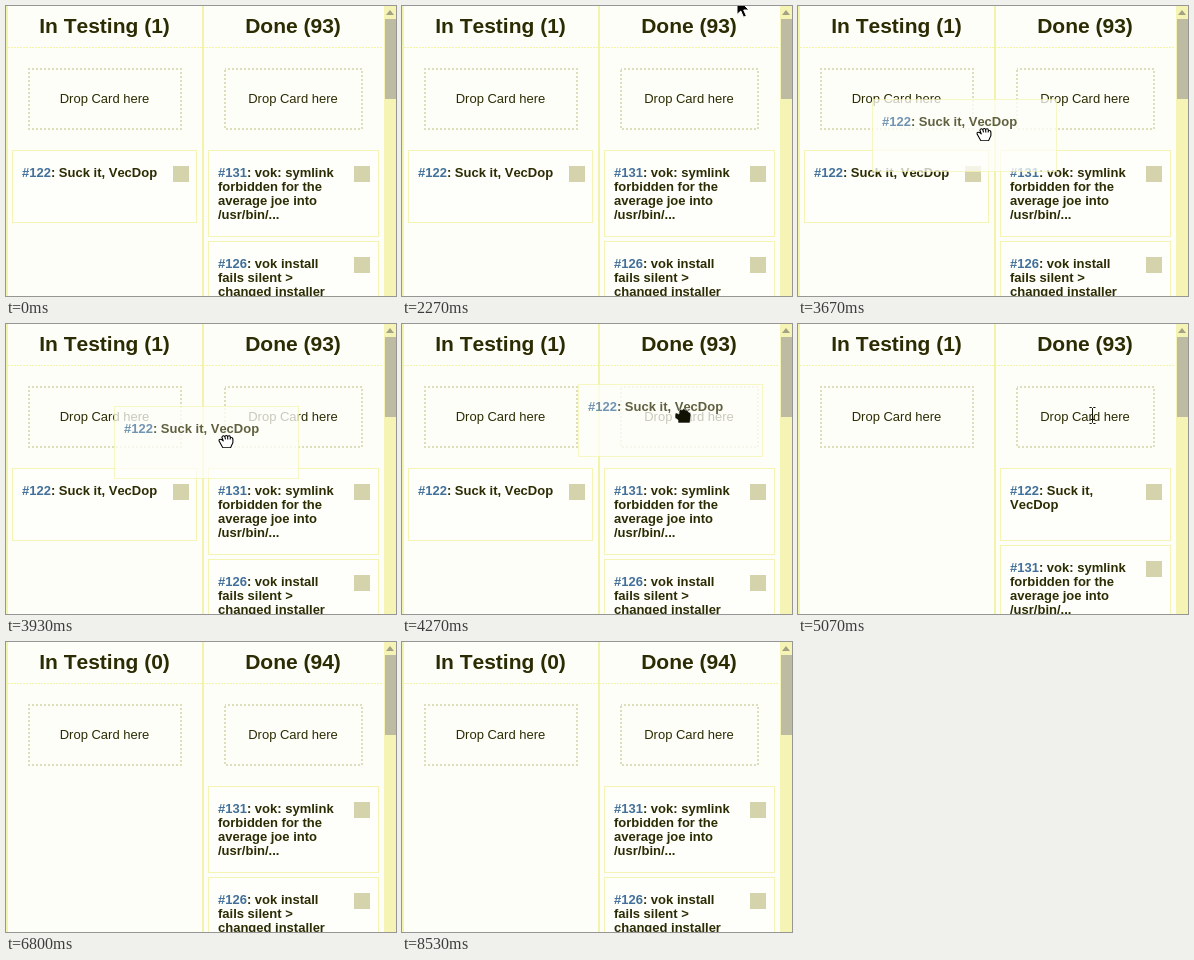
An HTML page for the animation above (9330 ms loop, 390 by 290 pixels).

```html
<!DOCTYPE html>
<html lang="en">
<head>
<meta charset="utf-8">
<title>Card board</title>
<style>
  html, body { margin: 0; width: 100%; height: 100%; overflow: hidden; background: #fefef8; }
  svg { display: block; width: 390px; height: 290px; }
  text { font: 13px "Liberation Sans", Arial, sans-serif; font-kerning: none; fill: #2c2c04; white-space: pre; }
  .title { font-size: 21px; font-weight: bold; text-anchor: middle; }
  .drop text { text-anchor: middle; }
  .drop rect { fill: none; stroke: #dedebc; stroke-width: 2; stroke-dasharray: 2 2; stroke-dashoffset: 1; }
  .card text { font-weight: bold; }
  .card .id { fill: #42709a; }
  .card .box { fill: #fefefa; stroke: #f5f4b4; }
  .line { stroke: #f4f3ac; fill: none; }

  /* One loop is 140 ticks; percentages are tick / 140. */
  .anim { animation: 9330ms step-end infinite; }
  #pointer { animation-name: travel; }
  #arrow { animation-name: arrow; }
  #hand { animation-name: hand; }
  #fist { animation-name: fist; }
  #beam { animation-name: beam; }
  #ghost { animation-name: ghost; }
  #waiting { animation-name: waiting; }
  #moved { animation-name: moved; }
  #list { animation-name: push; }
  .before { animation-name: before; }
  .after { animation-name: after; }

  @keyframes travel {
    0% { transform: translate(335px, -8px); }
    24.286% { transform: translate(335px, -8px); animation-timing-function: steps(11); }
    32.143% { transform: translate(112px, 174px); }
    34.286% { transform: translate(112px, 174px); animation-timing-function: steps(7); }
    39.286% { transform: translate(180px, 124px); animation-timing-function: steps(9); }
    45.714% { transform: translate(282px, 91px); animation-timing-function: steps(5); }
    49.286% { transform: translate(295px, 91px); }
    65.714% { transform: translate(295px, 91px); animation-timing-function: steps(5); }
    69.286% { transform: translate(340px, 104px); }
    70.714% { transform: translate(340px, 104px); animation-timing-function: steps(3); }
    72.857%, 100% { transform: translate(394px, 130px); }
  }
  @keyframes arrow {
    0%, 35%, 72.857%, 100% { visibility: hidden; }
    24.286%, 66.429% { visibility: visible; }
  }
  @keyframes hand {
    0%, 42.857%, 100% { visibility: hidden; }
    35% { visibility: visible; }
  }
  @keyframes fist {
    0%, 51.429%, 100% { visibility: hidden; }
    42.857% { visibility: visible; }
  }
  @keyframes beam {
    0%, 66.429%, 100% { visibility: hidden; }
    51.429% { visibility: visible; }
  }
  @keyframes ghost {
    0%, 51.429%, 100% { visibility: hidden; }
    35% { visibility: visible; }
  }
  @keyframes waiting {
    0% { visibility: visible; }
    52.143%, 100% { visibility: hidden; }
  }
  @keyframes moved {
    0%, 59.286%, 100% { visibility: hidden; }
    52.143% { visibility: visible; }
  }
  @keyframes push {
    0%, 59.286%, 100% { transform: none; }
    52.143% { transform: translateY(77px); }
  }
  @keyframes before {
    0% { visibility: visible; }
    59.286%, 100% { visibility: hidden; }
  }
  @keyframes after {
    0% { visibility: hidden; }
    59.286%, 100% { visibility: visible; }
  }
</style>
</head>
<body>
<svg viewBox="0 0 390 290">
  <defs>
    <rect id="badge" width="16" height="16" fill="#d5d3ab"/>
    <g id="task" class="card">
      <rect class="box" x=".5" y=".5" width="184" height="72"/>
      <text x="10" y="27"><tspan class="id">#122</tspan>: Suck it, VecDop</text>
    </g>
  </defs>

  <g class="line">
    <path d="M1 0V290M197 0V290" stroke-width="2"/>
    <path d="M2 41.5H377" stroke-dasharray="2 1"/>
  </g>

  <g>
    <text class="title anim before" x="98.5" y="27">In Testing (1)</text>
    <text class="title anim after" x="98.5" y="27">In Testing (0)</text>
    <text class="title anim before" x="287" y="27">Done (93)</text>
    <text class="title anim after" x="287" y="27">Done (94)</text>
  </g>

  <g class="drop">
    <rect x="23" y="63" width="152" height="60"/>
    <text x="98.5" y="97">Drop Card here</text>
    <rect x="219" y="63" width="137" height="60"/>
    <text x="287" y="97">Drop Card here</text>
  </g>

  <g id="waiting" class="anim">
    <use href="#task" x="6" y="144"/>
    <use href="#badge" x="167" y="160"/>
  </g>

  <g id="moved" class="anim card">
    <rect class="box" x="202.5" y="144.5" width="170" height="72"/>
    <text x="212" y="171"><tspan class="id">#122</tspan>: Suck it,<tspan x="212" dy="14">VecDop</tspan></text>
    <use href="#badge" x="348" y="160"/>
  </g>

  <g id="list" class="anim card">
    <rect class="box" x="202.5" y="144.5" width="170" height="86"/>
    <text x="212" y="171"><tspan class="id">#131</tspan>: vok: symlink<tspan x="212" dy="14">forbidden for the</tspan><tspan x="212" dy="14">average joe into</tspan><tspan x="212" dy="14">/usr/bin/...</tspan></text>
    <use href="#badge" x="348" y="160"/>
    <rect class="box" x="202.5" y="235.5" width="170" height="86"/>
    <text x="212" y="262"><tspan class="id">#126</tspan>: vok install<tspan x="212" dy="14">fails silent &gt;</tspan><tspan x="212" dy="14">changed installer</tspan></text>
    <use href="#badge" x="348" y="251"/>
  </g>

  <g id="scrollbar">
    <rect x="378" width="12" height="290" fill="#f5f4b4"/>
    <path d="M380 9l4-5 4 5z" fill="#a3a284"/>
    <rect x="379" y="13" width="11" height="80" fill="#bdbba2"/>
  </g>

  <g id="pointer" class="anim">
    <g id="ghost" class="anim" opacity=".75"><use href="#task" x="-106" y="-31"/></g>
    <path id="arrow" class="anim" d="M0 0V16.5L3.8 13 6.5 19.2 9.4 18 6.7 12H12z" fill="#000" stroke="#fff"/>
    <path id="hand" class="anim" transform="translate(6 4) scale(.92 .78)" fill="#fff" stroke="#000" stroke-width="1.2" stroke-linejoin="round"
      d="M-7.5 0Q-8-3-5-2L-3 0-4.5-5Q-3-8-1.3-5.5 0-8.5 1.7-6 4-8 4.8-5 7.5-5 7.5-2V2L5 8.5H-3.5zM-1.3-5.5L-.5-2M1.7-6L2-2M4.8-5L4.5-2"/>
    <path id="fist" class="anim" transform="translate(-1 0)" fill="#111104" stroke="#fff" stroke-width=".6"
      d="M-8-1Q-7-3-4-1V-4Q-3-7-1-5 1-8 2.5-5 5-6 5.5-3 8-3 8 0L7 8H-5V5L-8 3z"/>
    <path id="beam" class="anim" fill="none" stroke="#111104"
      d="M-3.5-7.5H-1.5L-.5-6.5 .5-7.5H2.5M-.5-6.5V7M-3.5 8.5H-1.5L-.5 7.5 .5 8.5H2.5M-2.5 4.5H1.5"/>
  </g>
</svg>
</body>
</html>
```
